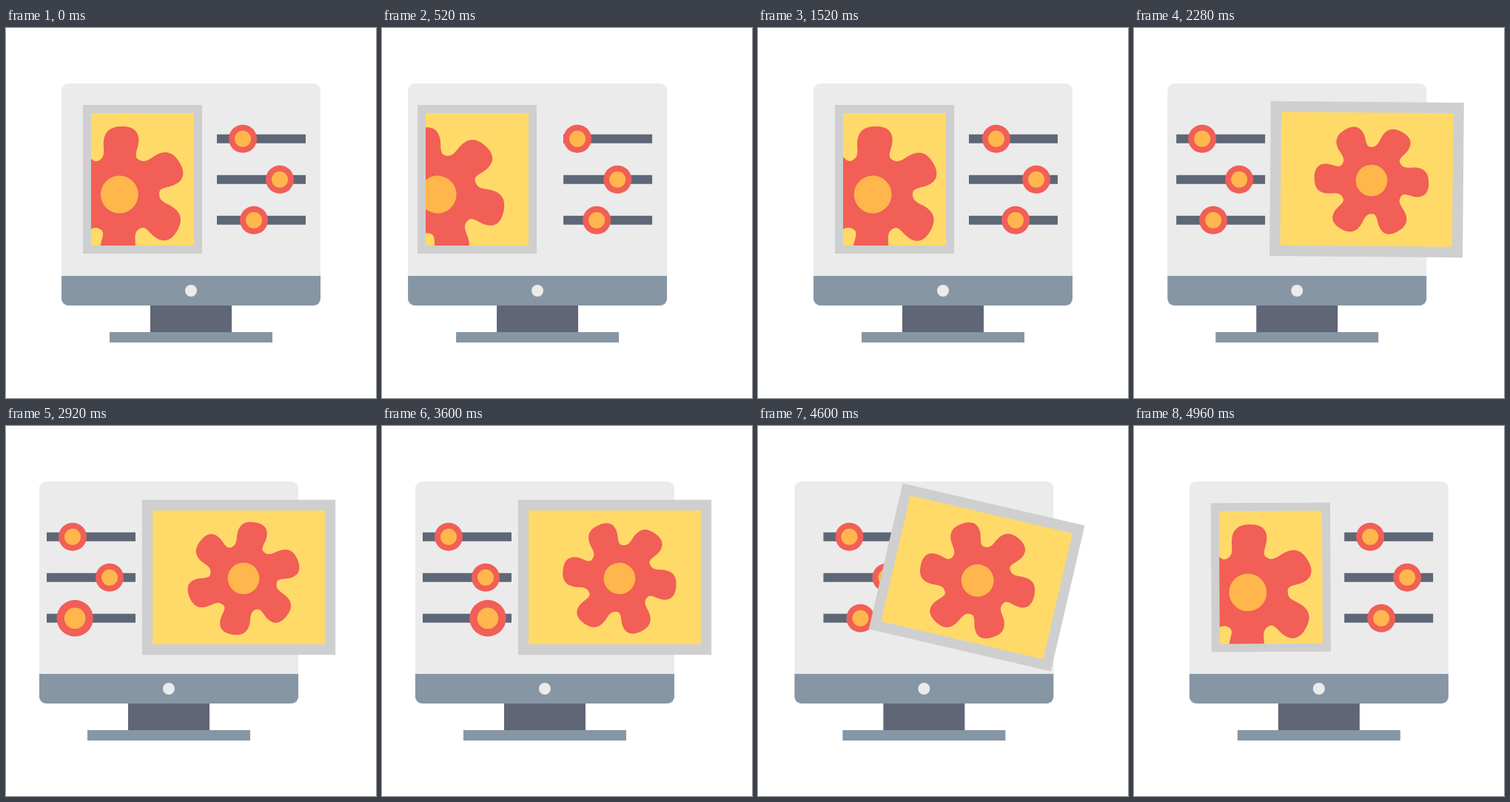
An HTML page with a canvas that plays this animation: 500 by 500 pixels, repeating every 5000 ms.

```html
<!DOCTYPE html>
<html lang="en">
<head>
<meta charset="utf-8">
<title>Image editor</title>
<style>
html, body { margin: 0; width: 100%; height: 100%; overflow: hidden; background: #fff; }
canvas { display: block; }
</style>
</head>
<body>
<canvas id="stage" width="500" height="500"></canvas>
<script>
const ctx = document.getElementById('stage').getContext('2d');
const LOOP = 5000;
const RED = '#f15f56', ORANGE = '#ffb64c', SLATE = '#5e6776', STEEL = '#8796a4', LIGHT = '#ebebeb';

// One petal, from notch to notch, pointing up.
const PETAL = 'M0 0L-27 -46.6C-20 -50.6 -21 -58 -21.5 -66C-22 -84 -14 -92 4 -92' +
  'C19 -92 26 -85 26 -74C26 -66 23.5 -62 22.5 -56C21.5 -50 23.5 -48.5 26.9 -46.6Z';
const flowerPath = new Path2D();
for (let i = 0; i < 6; i++) {
  flowerPath.addPath(new Path2D(PETAL), new DOMMatrix().rotate(i * 60));
}
flowerPath.arc(0, 0, 50, 0, 7);

const mix = (a, b, k) => a + (b - a) * k;

// cubic-bezier(.667, 0, .333, 1)
function ease(x) {
  if (x <= 0) return 0;
  if (x >= 1) return 1;
  let lo = 0, hi = 1;
  for (let i = 0; i < 24; i++) {
    const s = (lo + hi) / 2;
    if (2 * s - 3 * s * s + 2 * s * s * s < x) lo = s; else hi = s;
  }
  return lo * lo * (3 - 2 * lo);
}

const ramp = (t, start, end) => ease((t - start) / (end - start));

function track(t, keys) {
  let value = keys[0][1];
  for (let i = 1; i < keys.length; i++) {
    value += (keys[i][1] - keys[i - 1][1]) * ramp(t, keys[i - 1][0], keys[i][0]);
  }
  return value;
}

const sway = t => track(t, [[0, 0], [500, -1], [1000, 1], [1500, 0]]);
const zoomed = (t, start, end) => ramp(t, start, end) - ramp(t, 4400, 5000);

function box(color, x, y, w, h, radii = 0) {
  ctx.fillStyle = color;
  ctx.beginPath();
  ctx.roundRect(x, y, w, h, radii);
  ctx.fill();
}

function disc(color, x, y, r) {
  ctx.fillStyle = color;
  ctx.beginPath();
  ctx.arc(x, y, r, 0, 7);
  ctx.fill();
}

function drawMonitor(x) {
  box(SLATE === '' ? '' : '#606676', x + 195, 375, 110, 36);
  box(STEEL, x + 140, 411, 220, 14);
  box(LIGHT, x + 75, 75, 350, 260, [9, 9, 0, 0]);
  box(STEEL, x + 75, 335, 350, 40, [0, 0, 9, 9]);
  disc(LIGHT, x + 250, 355, 8);
}

function drawSliders(t, x, drag) {
  const grow = 1 + 0.3 * (ramp(t, 2500, 2700) - ramp(t, 4350, 4550));
  [320, 370, 335].forEach((home, i) => {
    const y = 149.8 + i * 55;
    const last = i === 2;
    const size = last ? grow : 1;
    const knob = x + home + 18 * sway(t - 172 - i * 71) + (last ? drag : 0);
    box(SLATE, x + 285, y - 6, 120, 12);
    disc(RED, knob, y, 19 * size);
    disc(ORANGE, knob, y, 11 * size);
  });
}

function drawPicture(t, drag) {
  const shift = zoomed(t, 1690, 2280);
  const turn = zoomed(t, 1730, 2330);
  const flowerSway = sway(t - 100);

  ctx.save();
  ctx.translate(mix(184.5, 314.5, shift) + 56 * sway(t - 33), 204.5);
  ctx.rotate(-turn * Math.PI / 2);
  ctx.scale(1 + 0.3 * turn, 1 + 0.3 * turn);
  box('#cfcfcf', -80.5, -100.5, 161, 201);
  box('#ffda69', -69.5, -89.5, 139, 179);
  ctx.clip();

  ctx.setTransform(1, 0, 0, 1, 0, 0);
  ctx.translate(mix(153.3, 321, shift) + 80 * flowerSway, mix(225, 206, shift));
  ctx.rotate((18 * flowerSway - 90 * turn + 1.75 * drag) * Math.PI / 180);
  ctx.scale(1 - 0.16 * turn, 1 - 0.16 * turn);
  ctx.fillStyle = RED;
  ctx.fill(flowerPath);
  disc(ORANGE, 0, 0, 25.4);
  ctx.restore();
}

function draw(t) {
  const move = zoomed(t, 1744, 2344);
  const wobble = 40 * sway(t);
  const drag = track(t, [[2700, 0], [3150, -25], [3650, 38.5], [4000, -25], [4350, 0]]);
  ctx.fillStyle = '#fff';
  ctx.fillRect(0, 0, 500, 500);
  drawMonitor(wobble - 30 * move);
  drawSliders(t, wobble - 230 * move, drag);
  drawPicture(t, drag);
}

function tick() {
  draw(performance.now() % LOOP);
  requestAnimationFrame(tick);
}
tick();
</script>
</body>
</html>
```
